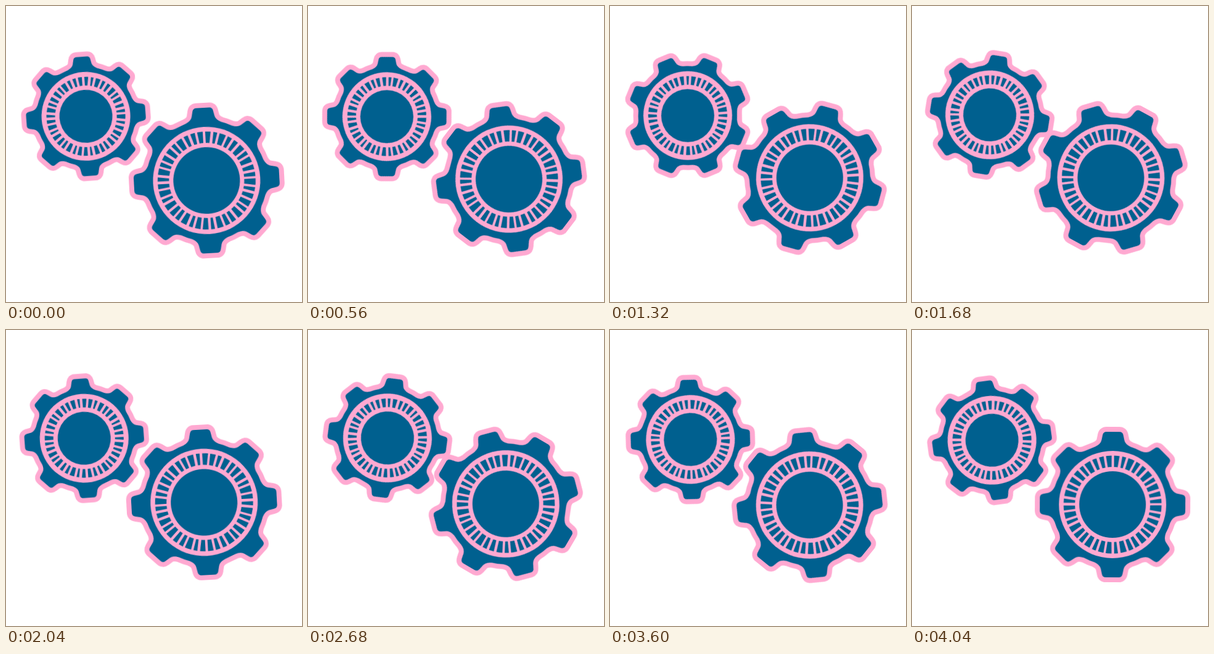
Animation, 480 px wide and 480 px high, one loop 4080 ms. Source, as an HTML page:

```html
<!DOCTYPE html>
<html lang="en">
<head>
<meta charset="utf-8">
<title>Turning gears</title>
<style>
  html, body { margin: 0; width: 100%; height: 100%; overflow: hidden; background: #fff; }
  svg { display: block; width: 100vw; height: 100vh; }
  .spin { animation: spin 4080ms steps(102) infinite; transform-origin: 0 0; }
  .back { animation-direction: normal; animation-name: spin-back; }
  .pink { fill: #ffa9d1; }
  .blue { fill: #00608f; }
  .edge { fill: #ffa9d1; stroke: #ffa9d1; stroke-width: 16; stroke-linejoin: round; }
  .spoke { stroke: #ffa9d1; }
  @keyframes spin { to { transform: rotate(360deg); } }
  @keyframes spin-back { to { transform: rotate(-360deg); } }
</style>
</head>
<body>
<svg id="stage" viewBox="0 0 480 480"></svg>
<script>
  const TEETH = 8, SPOKES = 40, RAD = Math.PI / 180;

  // Each gear turns about a pivot slightly off its own centre.
  const gears = [
    { pivot: [128.2, 177.2], off: 2.2, dir: 50, tilt: -4.2, size: 0.82,
      rings: [72, 64, 50, 43], spin: "spin" },
    { pivot: [323.3, 281.2], off: 2.7, dir: 40, tilt: -3.2, size: 1,
      rings: [87, 79.5, 61, 54], spin: "spin back" }
  ];

  function outline(size) {
    const valley = 98, foot = 17 * RAD;
    const fx = valley * Math.sin(foot), fy = -valley * Math.cos(foot);
    let d = "";
    for (let i = 0; i < TEETH; i++) {
      const a = i * 2 * Math.PI / TEETH, c = Math.cos(a), s = Math.sin(a);
      const p = (x, y) =>
        ((x * c - y * s) * size).toFixed(2) + " " + ((x * s + y * c) * size).toFixed(2);
      const r = valley * size;
      d += (i ? `A${r} ${r} 0 0 1 ` : "M") + p(-fx, fy) +
        `Q${p(-20, -98)} ${p(-18.6, -104)}L${p(-16.8, -112.5)}` +
        `Q${p(-15.8, -118)} ${p(-10.5, -118)}L${p(10.5, -118)}` +
        `Q${p(15.8, -118)} ${p(16.8, -112.5)}L${p(18.6, -104)}` +
        `Q${p(20, -98)} ${p(fx, fy)}`;
    }
    return d + "Z";
  }

  const disc = (r, cls) => `<circle r="${r}" class="${cls}"/>`;

  function spokes(inner, outer) {
    let out = "";
    for (let i = 0; i < SPOKES; i++) {
      const turn = i * 360 / SPOKES + 0.8 * Math.sin(i * 2.4);
      const width = 4 + 0.5 * Math.sin(i * 1.7);
      out += `<path class="spoke" d="M0 ${-inner}V${-outer}" ` +
        `stroke-width="${width.toFixed(2)}" transform="rotate(${turn.toFixed(2)})"/>`;
    }
    return out;
  }

  function place(g, body) {
    const x = g.off * Math.cos(g.dir * RAD), y = g.off * Math.sin(g.dir * RAD);
    return `<g transform="translate(${g.pivot})"><g class="${g.spin}">` +
      `<g transform="translate(${x} ${y}) rotate(${g.tilt})">${body}</g></g></g>`;
  }

  function face(g) {
    const [rim, outer, inner, hub] = g.rings;
    return `<path class="blue" d="${outline(g.size)}"/>` +
      disc(rim, "pink") + disc(outer, "blue") + spokes(inner - 1, outer + 1) +
      disc(inner, "pink") + disc(hub, "blue");
  }

  // Both pink edges lie below both blue bodies.
  document.getElementById("stage").innerHTML =
    gears.map(g => place(g, `<path class="edge" d="${outline(g.size)}"/>`)).join("") +
    gears.map(g => place(g, face(g))).join("");
</script>
</body>
</html>
```
